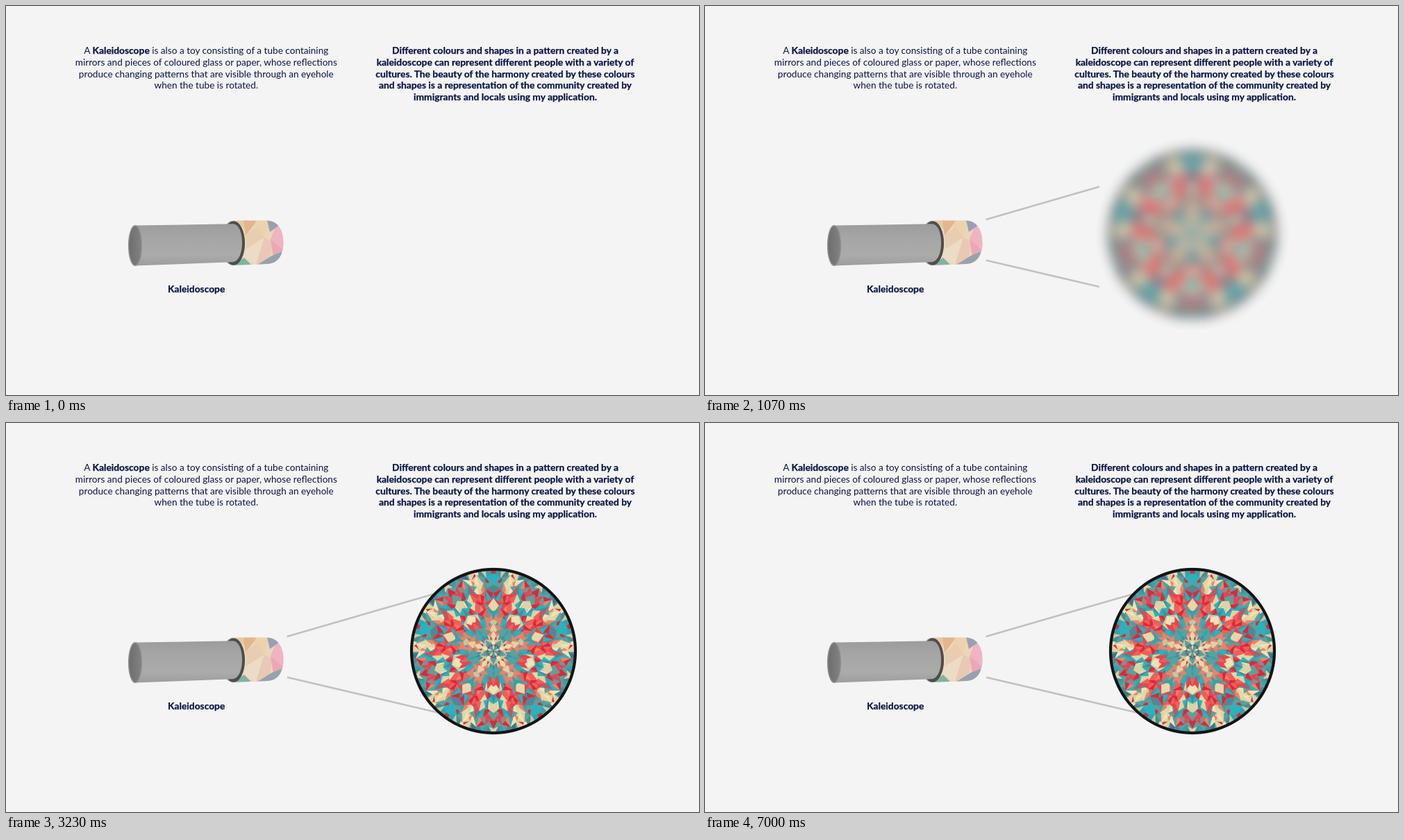
Animation of 998x561 px, one loop 7030 ms. Source, as an HTML page with a canvas:

```html
<!DOCTYPE html>
<html lang="en">
<head>
<meta charset="utf-8">
<title>Kaleidoscope</title>
<style>
  html, body { margin: 0; width: 100%; height: 100%; overflow: hidden; background: #f4f4f4; }
  svg { position: absolute; left: 0; top: 0; width: 998px; height: 561px; }
  text { font: 13.6px Lato, "Open Sans", sans-serif; fill: #0a1446; text-anchor: middle; }
  .bold { font-weight: 700; font-size: 13.8px; stroke: #0a1446; stroke-width: .25px; }
  #disc { position: absolute; left: 580px; top: 207px; width: 244px; height: 244px; }
</style>
</head>
<body>
<svg viewBox="0 0 998 561">
  <defs>
    <linearGradient id="metal" x1="0" y1="0" x2="0" y2="1">
      <stop offset="0" stop-color="#9c9c9c"/>
      <stop offset=".3" stop-color="#a5a5a5"/>
      <stop offset=".75" stop-color="#ababaa"/>
      <stop offset="1" stop-color="#9d9d9d"/>
    </linearGradient>
    <linearGradient id="hollow">
      <stop offset="0" stop-color="#6d6d6d"/>
      <stop offset="1" stop-color="#828282"/>
    </linearGradient>
    <clipPath id="cap">
      <path d="M327 309.5H376C392 309.5 399.5 324 399.5 341C399.5 359 392 371.5 376 372L325 374Z"/>
    </clipPath>
  </defs>
  <g id="copy"></g>
  <g clip-path="url(#cap)" id="facets"></g>
  <ellipse cx="327" cy="342" rx="17" ry="32.3" fill="#8f8d86"/>
  <ellipse cx="328" cy="342" rx="16" ry="31.6" fill="#4d4d4b"/>
  <path d="M186 316.5L327 314.3C336 315 340 328 340 342C340 356 335 368 327 369.3L186 374.5Z" fill="url(#metal)"/>
  <ellipse cx="186" cy="345.5" rx="9.3" ry="28.7" fill="url(#hollow)" stroke="#8f8f8f" stroke-width="1.6"/>
</svg>
<svg id="rays" viewBox="0 0 998 561" fill="none" stroke="#c1c1c1" stroke-width="2.6">
  <path d="M404.5 307.9L634 241.5M405 366.8L634 420.5"/>
</svg>
<canvas id="disc" width="488" height="488"></canvas>

<script>
const LOOP = 7030;
const $ = id => document.getElementById(id);

function add(parent, tag, attrs, html = '') {
  const el = document.createElementNS('http://www.w3.org/2000/svg', tag);
  for (const key in attrs) el.setAttribute(key, attrs[key]);
  el.innerHTML = html;
  parent.append(el);
}

function paragraph(x, y, lines, cls = '') {
  lines.forEach((line, i) => add($('copy'), 'text', { x, y: y + i * 16.65, class: cls }, line));
}

paragraph(288.3, 69.4, [
  'A <tspan class="bold">Kaleidoscope</tspan> is also a toy consisting of a tube containing',
  'mirrors and pieces of coloured glass or paper, whose reflections',
  'produce changing patterns that are visible through an eyehole',
  'when the tube is rotated.'
]);
paragraph(719, 69.4, [
  'Different colours and shapes in a pattern created by a',
  'kaleidoscope can represent different people with a variety of',
  'cultures. The beauty of the harmony created by these colours',
  'and shapes is a representation of the community created by',
  'immigrants and locals using my application.'
], 'bold');
paragraph(274.2, 413.2, ['Kaleidoscope'], 'bold');

const facets = {
  '320,305 405,305 405,380 320,380': '#ead7bb',
  '330,309 348,309 344,322': '#e5c9a5',
  '342,309 362,309 345,331': '#e3b68e',
  '360,309 380,309 372,334 357,322': '#ecd3ae',
  '345,331 362,318 372,334 347,350': '#e8cdb0',
  '347,350 372,334 360,373 342,362': '#ecdcc5',
  '372,334 384,340 378,373 360,373': '#e9c8b4',
  '381,336 390,314 400,318 400,352': '#f0b3c2',
  '381,336 400,352 385,362': '#eba7b7',
  '376,309 395,309 391,318 380,326': '#9aa0b2',
  '362,373 383,360 398,354 392,375': '#98a2ac',
  '325,376 343,363 354,374': '#7fb3a2'
};
for (const points in facets) add($('facets'), 'polygon', { points, fill: facets[points] });

// Mirrored wedges of cut glass: [outer radius, colour family of each cell].
const rings = [
  [10, 'd'], [18, 'c'], [27, 'tc'], [37, 'tr'], [48, 'rtt'], [60, 'crt'],
  [73, 'trrc'], [86, 'ctrrt'], [98, 'dtrcr'], [109, 'dtcctr'], [121, 'ctdctr']
];
const shades = {
  r: ['#e9434f', '#d62a3c', '#ef5f59', '#ee8168'],
  t: ['#2cb2bc', '#36a2aa', '#4c8a96', '#5f9f9c'],
  c: ['#efe3b4', '#ddd3a6', '#c5c8a4', '#e3d9ab'],
  d: ['#3f7487', '#2cadb8', '#4b6f80', '#5f9f9c']
};

function seeded(seed) {
  return () => (seed = seed * 16807 % 2147483647) / 2147483647;
}

function makeGlass() {
  const rand = seeded(4127);
  const pick = list => list[Math.floor(rand() * list.length)];
  const glass = [];
  for (let k = rings.length - 1; k >= 0; k--) {
    const [outer, cells] = rings[k];
    const inner = k ? rings[k - 1][0] - 5 : 0;
    const n = cells.length;
    const edge = Array.from({ length: n + 1 }, (_, i) => ({
      u: (i + (i % n ? (rand() - .5) * .5 : 0)) / n,
      r: outer + (i % 2 ? -2.5 : 3) * Math.min(1, outer / 30)
    }));
    for (let i = 0; i < n; i++) {
      const a = edge[i], b = edge[i + 1];
      const hub = {
        u: a.u + (b.u - a.u) * (.3 + rand() * .4),
        r: inner + (outer - inner) * (.45 + rand() * .3)
      };
      const rim = [{ u: a.u, r: inner }, a, b, { u: b.u, r: inner }];
      rim.forEach((p, j) => {
        const family = rand() < .5 ? pick('rrttc') : cells[i];
        glass.push({ points: [p, rim[(j + 1) % 4], hub], color: pick(shades[family]) });
      });
    }
  }
  return glass;
}

function drawDisc() {
  const ctx = $('disc').getContext('2d');
  ctx.scale(2, 2);
  ctx.translate(122, 122);
  ctx.save();
  ctx.beginPath();
  ctx.arc(0, 0, 118, 0, 7);
  ctx.clip();
  ctx.lineWidth = .4;
  for (const { points, color } of makeGlass()) {
    ctx.fillStyle = ctx.strokeStyle = color;
    for (let w = 0; w < 10; w++) {
      const axis = Math.PI / 2 + Math.floor(w / 2) * Math.PI * .4;
      const side = w % 2 ? -1 : 1;
      ctx.beginPath();
      for (const { u, r } of points) {
        const angle = axis + side * u * Math.PI / 5;
        ctx.lineTo(r * Math.cos(angle), r * Math.sin(angle));
      }
      ctx.closePath();
      ctx.fill();
      ctx.stroke();
    }
  }
  ctx.restore();
  ctx.strokeStyle = '#141416';
  ctx.lineWidth = 4.2;
  ctx.beginPath();
  ctx.arc(0, 0, 118, 0, 7);
  ctx.stroke();
}

function reveal(el, prop, from, to, start, end) {
  el.animate([
    { [prop]: from, offset: 0 },
    { [prop]: from, offset: start / LOOP },
    { [prop]: to, offset: end / LOOP },
    { [prop]: to, offset: 1 }
  ], { duration: LOOP, iterations: Infinity });
}

drawDisc();
reveal($('rays'), 'clipPath', 'inset(0 594px 0 0)', 'inset(0 366px 0 0)', 410, 1330);
reveal($('disc'), 'filter', 'blur(33px)', 'blur(0px)', 410, 1330);
reveal($('disc'), 'opacity', 0, 1, 410, 1160);
</script>
</body>
</html>
```
